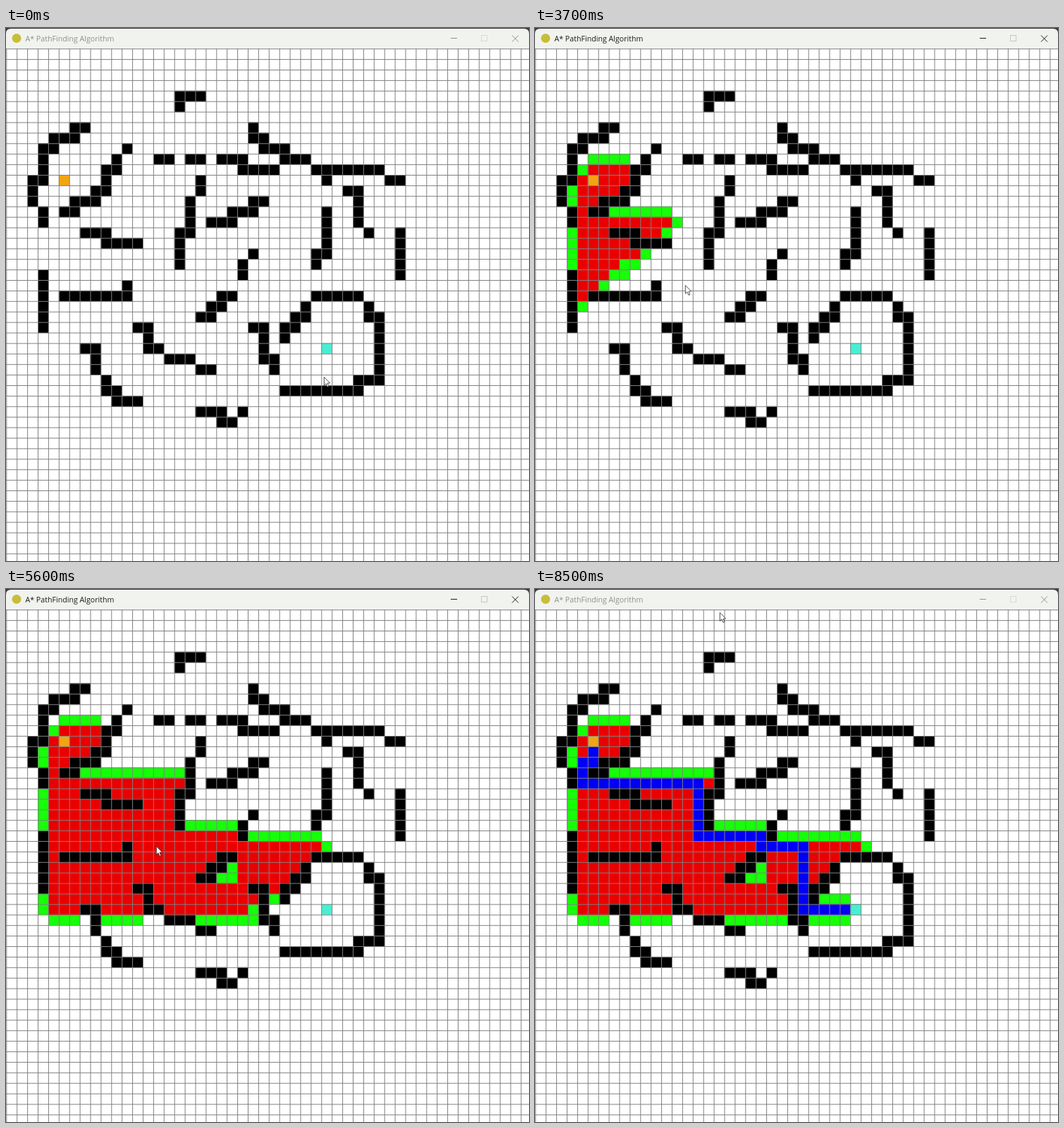
Write an HTML page with a canvas that moves like this. It is 742 by 755 pixels and loops after 8600 ms.

```html
<!DOCTYPE html>
<html lang="en">
<head>
<meta charset="utf-8">
<title>Path finding</title>
<style>
  html, body { margin: 0; width: 100%; height: 100%; overflow: hidden; background: #fff; }
  canvas { display: block; }
</style>
</head>
<body>
<canvas id="stage" width="742" height="755"></canvas>
<script>
const ctx = document.getElementById('stage').getContext('2d');
const W = 742, H = 755, LOOP = 8600, TICK = 100;
const SIZE = 50, CELL = 14.9, LEFT = 0.3, TOP = 29.2;
const START = [5, 12], END = [30, 28];
const COLORS = {
  wall: '#000', open: '#16ff08', closed: '#e90000', path: '#0000f4',
  start: '#f3a412', end: '#48efd3', line: '#808080', bar: '#f1f3ef'
};

// Walls: a first cell, then a walk (s and e are the downward diagonals).
const MOVES = { r: [1, 0], l: [-1, 0], d: [0, 1], u: [0, -1], s: [-1, 1], e: [1, 1] };
const STROKES = [
  [18, 4, 'lld'], [7, 7, 'ldlldldddldded'], [11, 9, 'sdlddldlldl'],
  [14, 10, 'r'], [17, 10, 'r'], [23, 7, 'drdrrdrrerrrrrrer'],
  [20, 10, 'rrdrrr'], [30, 12, ''], [32, 13, 'rddde'], [37, 17, 'dddd'],
  [18, 12, 'dsdddlddd'], [24, 14, 'ldlldll'], [30, 15, 'ddddld'],
  [7, 17, 'rrdrrr'], [23, 19, 'sd'], [3, 21, 'ddddd'], [5, 23, 'rrrrrru'],
  [21, 23, 'ldldl'], [33, 23, 'llllsdldld'], [33, 23, 'edrddddddlldlllllll'],
  [12, 26, 'rddrerrer'], [23, 26, 'rdddrd'], [7, 28, 'rddedrdrr'],
  [18, 34, 'rrdr'], [22, 34, '']
];

const id = (x, y) => y * SIZE + x;
const walls = new Set();
for (const [sx, sy, walk] of STROKES) {
  let x = sx, y = sy;
  walls.add(id(x, y));
  for (const m of walk) {
    x += MOVES[m][0];
    y += MOVES[m][1];
    walls.add(id(x, y));
  }
}

// A* search; remembers the step at which each cell changes colour.
function search() {
  const openAt = new Map(), closedAt = new Map(), pathAt = new Map();
  const from = new Map(), cost = new Map();
  const start = id(...START), end = id(...END);
  const guess = (x, y) => Math.abs(END[0] - x) + Math.abs(END[1] - y);
  const queue = [{ f: guess(...START), order: 0, cell: start }];
  let order = 0, step = 0;
  cost.set(start, 0);
  while (queue.length) {
    queue.sort((a, b) => a.f - b.f || a.order - b.order);
    const cell = queue.shift().cell;
    if (cell === end) break;
    step++;
    const x = cell % SIZE, y = Math.floor(cell / SIZE), g = cost.get(cell) + 1;
    for (const m of 'rldu') {
      const nx = x + MOVES[m][0], ny = y + MOVES[m][1], next = id(nx, ny);
      if (nx < 0 || ny < 0 || nx >= SIZE || ny >= SIZE || walls.has(next)) continue;
      if (cost.has(next) && cost.get(next) <= g) continue;
      from.set(next, cell);
      cost.set(next, g);
      if (!openAt.has(next)) {
        openAt.set(next, step);
        queue.push({ f: g + guess(nx, ny), order: ++order, cell: next });
      }
    }
    if (cell !== start) closedAt.set(cell, step + 1);
  }
  for (let c = from.get(end); c !== undefined && c !== start; c = from.get(c)) {
    pathAt.set(c, ++step);
  }
  return { openAt, closedAt, pathAt, last: step };
}
const run = search();

const STEPS = [[3200, 9], [4100, 86], [4800, 151], [5600, 222], [6200, 276]];
const MOUSE_X = [[2400, 451], [2900, 213], [7000, 213], [7600, 258], [8100, 258], [8500, 262]];
const MOUSE_Y = [[2400, 494], [2900, 364], [7000, 364], [7600, 4], [8100, 4], [8500, 33]];

function track(keys, t) {
  if (t <= keys[0][0]) return keys[0][1];
  for (let i = 1; i < keys.length; i++) {
    const [t0, a] = keys[i - 1], [t1, b] = keys[i];
    if (t <= t1) return a + (b - a) * (t - t0) / (t1 - t0);
  }
  return keys[keys.length - 1][1];
}

function fillCell(cell, color) {
  ctx.fillStyle = color;
  ctx.fillRect(LEFT + (cell % SIZE) * CELL, TOP + Math.floor(cell / SIZE) * CELL, CELL + 0.5, CELL + 0.5);
}

function drawBoard(step) {
  ctx.fillStyle = '#fff';
  ctx.fillRect(0, 0, W, H);
  const paint = (stamps, color) => {
    for (const [cell, at] of stamps) if (at <= step) fillCell(cell, color);
  };
  fillCell(id(...END), COLORS.end);
  paint(run.openAt, COLORS.open);
  paint(run.closedAt, COLORS.closed);
  paint(run.pathAt, COLORS.path);
  for (const cell of walls) fillCell(cell, COLORS.wall);
  fillCell(id(...START), COLORS.start);
  if (step > run.last) fillCell(id(...END), COLORS.end);

  ctx.fillStyle = COLORS.line;
  for (let i = 0; i < SIZE; i++) {
    ctx.fillRect(LEFT + i * CELL, TOP, 1, H);
    ctx.fillRect(0, TOP + i * CELL, W, 1);
  }
}

function drawBar(active) {
  const ink = active ? '#1c1c1c' : '#8f918e';
  ctx.fillStyle = '#3c3c3c';
  ctx.fillRect(0, 0, W, 12);
  ctx.fillStyle = COLORS.bar;
  ctx.beginPath();
  ctx.moveTo(0, 29);
  ctx.lineTo(0, 8);
  ctx.quadraticCurveTo(0, 1, 7, 1);
  ctx.lineTo(W - 7, 1);
  ctx.quadraticCurveTo(W, 1, W, 8);
  ctx.lineTo(W, 29);
  ctx.fill();

  ctx.fillStyle = '#c8bd3a';
  ctx.beginPath();
  ctx.arc(15, 14.5, 6.5, 0, Math.PI * 2);
  ctx.fill();

  ctx.fillStyle = ink;
  ctx.font = '10.65px "Open Sans", "Noto Sans", sans-serif';
  ctx.fillText('A* PathFinding Algorithm', 27.5, 18.5);

  ctx.lineWidth = 1;
  ctx.strokeStyle = ink;
  ctx.beginPath();
  ctx.moveTo(631, 14.5);
  ctx.lineTo(640, 14.5);
  ctx.moveTo(718, 10.5);
  ctx.lineTo(727, 19.5);
  ctx.moveTo(727, 10.5);
  ctx.lineTo(718, 19.5);
  ctx.stroke();
  ctx.strokeStyle = active ? '#c6c8c4' : '#d8dad6';
  ctx.strokeRect(674.5, 10.5, 8, 8);
}

function drawMouse(x, y) {
  ctx.save();
  ctx.translate(x, y);
  ctx.beginPath();
  ctx.moveTo(0.3, 0.5);
  ctx.lineTo(0.3, 12.3);
  ctx.lineTo(3, 9.8);
  ctx.lineTo(5, 14.4);
  ctx.lineTo(6.9, 13.5);
  ctx.lineTo(5, 9.2);
  ctx.lineTo(8.6, 8.9);
  ctx.closePath();
  ctx.fillStyle = '#fff';
  ctx.fill();
  ctx.lineWidth = 0.8;
  ctx.strokeStyle = '#222';
  ctx.stroke();
  ctx.restore();
}

function frame(now) {
  const t = Math.floor((now % LOOP) / TICK) * TICK;
  drawBoard(t < STEPS[0][0] ? 0 : Math.round(track(STEPS, t)));
  drawBar(t >= 2600 && t < 8000);
  drawMouse(track(MOUSE_X, t), track(MOUSE_Y, t));
}

let begin;
function loop(now) {
  if (begin === undefined) begin = now;
  frame(Math.max(0, now - begin));
  requestAnimationFrame(loop);
}
frame(0);
requestAnimationFrame(loop);
</script>
</body>
</html>
```
